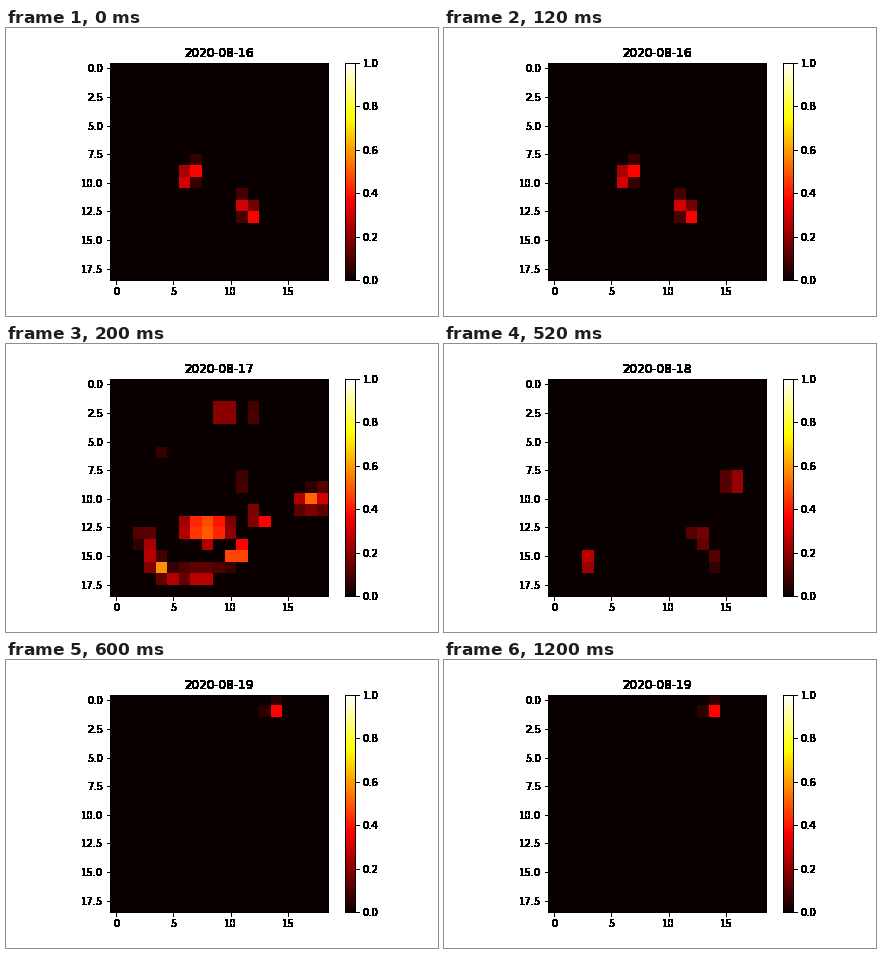
These frames come from a looping animation (432x288 px, 1600 ms). A matplotlib script:

```python
import numpy as np
import matplotlib.pyplot as plt
from matplotlib.animation import FuncAnimation
from matplotlib.lines import Line2D
from matplotlib.spines import Spine
from matplotlib.text import Text

SIZE = 19
STEP_MS = 200
STEPS = 8

plt.rcParams["font.family"] = "DejaVu Sans"


def spot(row, col, heat, height=.9, width=.9):
    """A dome of heat: its peak, and how far it reaches in cells."""
    rows, cols = np.mgrid[:SIZE, :SIZE]
    reach = ((rows - row) / height) ** 2 + ((cols - col) / width) ** 2
    return heat * np.clip(1 - reach, 0, None)


def heat_map(*spots):
    return np.max(spots, axis=0)


days = [
    heat_map(
        spot(9, 7, .37, 1.11), spot(9.6, 6, .348, 1.08),
        spot(12, 11, .30, 1.2), spot(12.8, 12, .38, 1.05),
    ),
    heat_map(
        # top and right
        spot(2.5, 9.5, .38, 1, 1), spot(2.55, 12, .13),
        spot(6, 4, .07), spot(8.55, 11, .12),
        spot(10.05, 17.05, .52, 1.11, 1.45), spot(11, 17, .17, .9, 1.95),
        spot(9, 18, .11),
        # centre
        spot(12.55, 7.9, .55, 1.55, 2.8), spot(14, 8, .25),
        spot(11.5, 12, .26), spot(12, 13, .37),
        spot(14, 11, .37), spot(15, 10.5, .68),
        # lower left
        spot(13.35, 2, .13), spot(14.7, 3, .26, 2.3), spot(16, 4, .58, 1.08),
        spot(16, 7.5, .13, .9, 3.5), spot(17, 5, .25, .9, 1.5),
        spot(17, 7.5, .38),
    ),
    heat_map(
        spot(8.5, 15, .16), spot(8.5, 16, .30),
        spot(13, 12, .11), spot(13.45, 13, .21),
        spot(15.45, 3, .35), spot(15.35, 14, .13),
    ),
    heat_map(spot(.95, 13.95, .37, 1.03, 1.03)),
]


def harden(pixels, dpi):
    """Make every pixel an artist touches fully opaque."""
    pixels = pixels.copy()
    pixels[..., 3] = pixels[..., 3] > 0
    return pixels, 0, 0


fig, ax = plt.subplots(figsize=(6, 4), dpi=72)
fig.subplots_adjust(left=.125, right=.9, bottom=.125, top=.88)
image = ax.imshow(days[0], cmap="hot", vmin=0, vmax=1,
                  interpolation="nearest")
fig.colorbar(image, ax=ax)
title = ax.set_title("2020-08-16")

fig.canvas.draw()
for artist in fig.findobj(lambda a: isinstance(a, (Text, Line2D, Spine))):
    artist.set_agg_filter(harden)


def update(step):
    day = min(step, len(days) - 1)
    image.set_data(days[day])
    title.set_text(f"2020-08-{16 + day}")
    return image, title


anim = FuncAnimation(fig, update, frames=STEPS, interval=STEP_MS,
                     repeat=True, repeat_delay=0)
plt.show()
```
